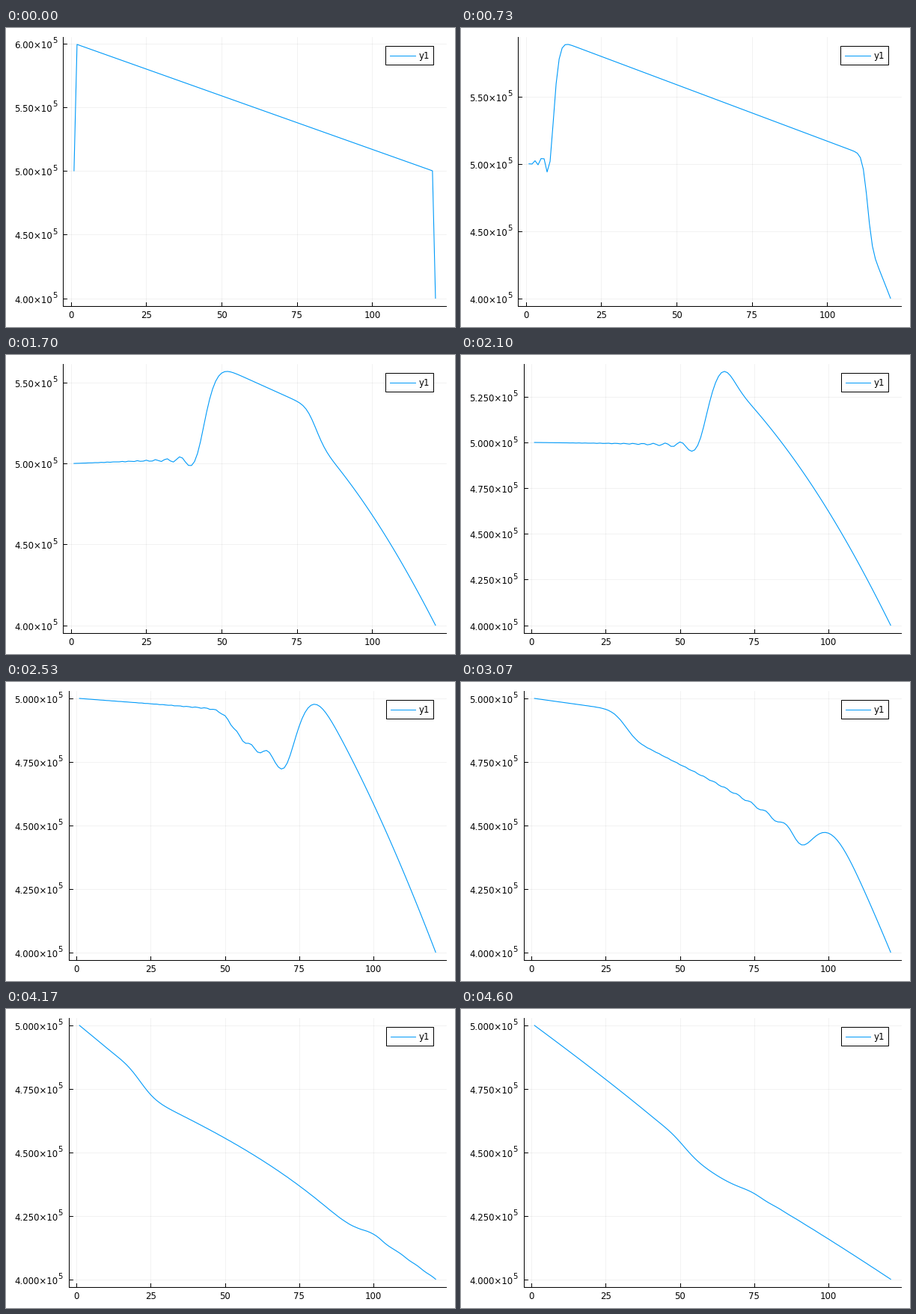
A matplotlib script that plays this animation: 600x400 px, repeating every 4630 ms.

```python
import math

import numpy as np
import matplotlib.pyplot as plt
from matplotlib.animation import FuncAnimation
from matplotlib.patches import Rectangle

LOOP_MS = 4630
FRAMES = 139
NODES = 121
FRICTION = 0.296
START_FLOW = 0.395
MIXING = 3.5
MAX_STEP = 0.1

TOP, BOTTOM, RIGHT = 11.8, 371.7, 588.4
BLUE = "#009af9"
HAIR = 0.72  # one pixel in points
FONT = 8.45


def sim_time(n):
    """Solver time per frame: a slow start, then nearly even steps."""
    if n < 21.5:
        return 9.5 * (max(n - 2, 0) / 19.5) ** 2
    return np.interp(n, [21.5, 38, 63, 92, 111.5, 118, 138],
                     [9.5, 28.3, 60, 96, 121, 132, 175.5])


def rates(p, m):
    """Isothermal pipe flow: pressure at nodes, mass flow on the faces between."""
    padded = np.pad(m, 1, mode="edge")
    left, right = padded[:-1], padded[1:]
    mean = (left + right) / 2
    speed = mean / p
    flux = speed * mean - MIXING * speed ** 2 * (right - left)
    dp = np.zeros_like(p)
    dp[1:-1] = -np.diff(m)
    drag = FRICTION * m * np.abs(m) / ((p[1:] + p[:-1]) / 2)
    return dp, -np.diff(p) - np.diff(flux) - drag


def rk4(p, m, h):
    a = rates(p, m)
    b = rates(p + h / 2 * a[0], m + h / 2 * a[1])
    c = rates(p + h / 2 * b[0], m + h / 2 * b[1])
    d = rates(p + h * c[0], m + h * c[1])
    return [s + h / 6 * (k1 + 2 * k2 + 2 * k3 + k4)
            for s, k1, k2, k3, k4 in zip((p, m), a, b, c, d)]


def simulate():
    p = np.append(np.linspace(6, 5, NODES - 1), 4.0)
    p[0] = 5
    m = np.full(NODES - 1, START_FLOW)
    history, now = [], 0.0
    for n in range(FRAMES):
        span = sim_time(n) - now
        steps = math.ceil(span / MAX_STEP)
        for _ in range(steps):
            p, m = rk4(p, m, span / steps)
        now += span
        history.append(p.copy())
    return history


pressure = simulate()

plt.rcParams["font.family"] = "DejaVu Sans"
fig = plt.figure(figsize=(6, 4), dpi=100, facecolor="white")
ax = fig.add_axes([0, 0, 1, 1])


def line(xs, ys, color="black", width=HAIR, **kw):
    ax.plot(xs, ys, color=color, lw=width, **kw)


def label(x, y, text, size=FONT, ha="left"):
    ax.text(x, y, text, fontsize=size, ha=ha, va="baseline", zorder=6)


def draw_legend(left):
    ax.add_patch(Rectangle((left, 24), 571.2 - left, 25.4, fc="white",
                           ec="black", lw=HAIR, zorder=4))
    line([left + 5.7, 547], [37, 37], BLUE, zorder=5)
    label(552, 41, "y1")


def draw(n):
    p = pressure[n]
    pad = 0.03 * (p.max() - p.min())
    low, high = p.min() - pad, p.max() + pad
    coarse = high >= 5.5
    step, digits = (0.5, 2) if coarse else (0.25, 3)
    left = 76.4 if coarse else 83.9

    def px(x):
        return left + (x + 2.6) / 127.2 * (RIGHT - left)

    def py(y):
        return BOTTOM - (y - low) / (high - low) * (BOTTOM - TOP)

    ax.clear()
    ax.set(xlim=(0, 600), ylim=(400, 0))
    ax.axis("off")
    grid = dict(width=0.5, alpha=0.075, zorder=1)

    for tick in range(0, 101, 25):
        x = px(tick)
        line([x, x], [TOP, BOTTOM], **grid)
        line([x, x], [BOTTOM - 5, BOTTOM])
        label(x, 387.5, str(tick), ha="center")

    for k in range(math.ceil(low / step), math.floor(high / step) + 1):
        y = py(k * step)
        line([left, RIGHT], [y, y], **grid)
        line([left, left + 5], [y, y])
        label(11.5, y + 6, f"{k * step:.{digits}f}×10")
        label(left - 11.4, y - 0.5, "5", size=7.2, ha="center")

    line([left, RIGHT], [BOTTOM, BOTTOM])
    line([left, left], [TOP, BOTTOM])
    line(px(np.arange(1, NODES + 1)), py(p), BLUE, 0.8, zorder=3)
    draw_legend(506.8 if coarse else 508)
    return []


anim = FuncAnimation(fig, draw, frames=FRAMES, init_func=lambda: [],
                     interval=LOOP_MS / FRAMES, repeat=True, repeat_delay=0)
plt.show()
```
